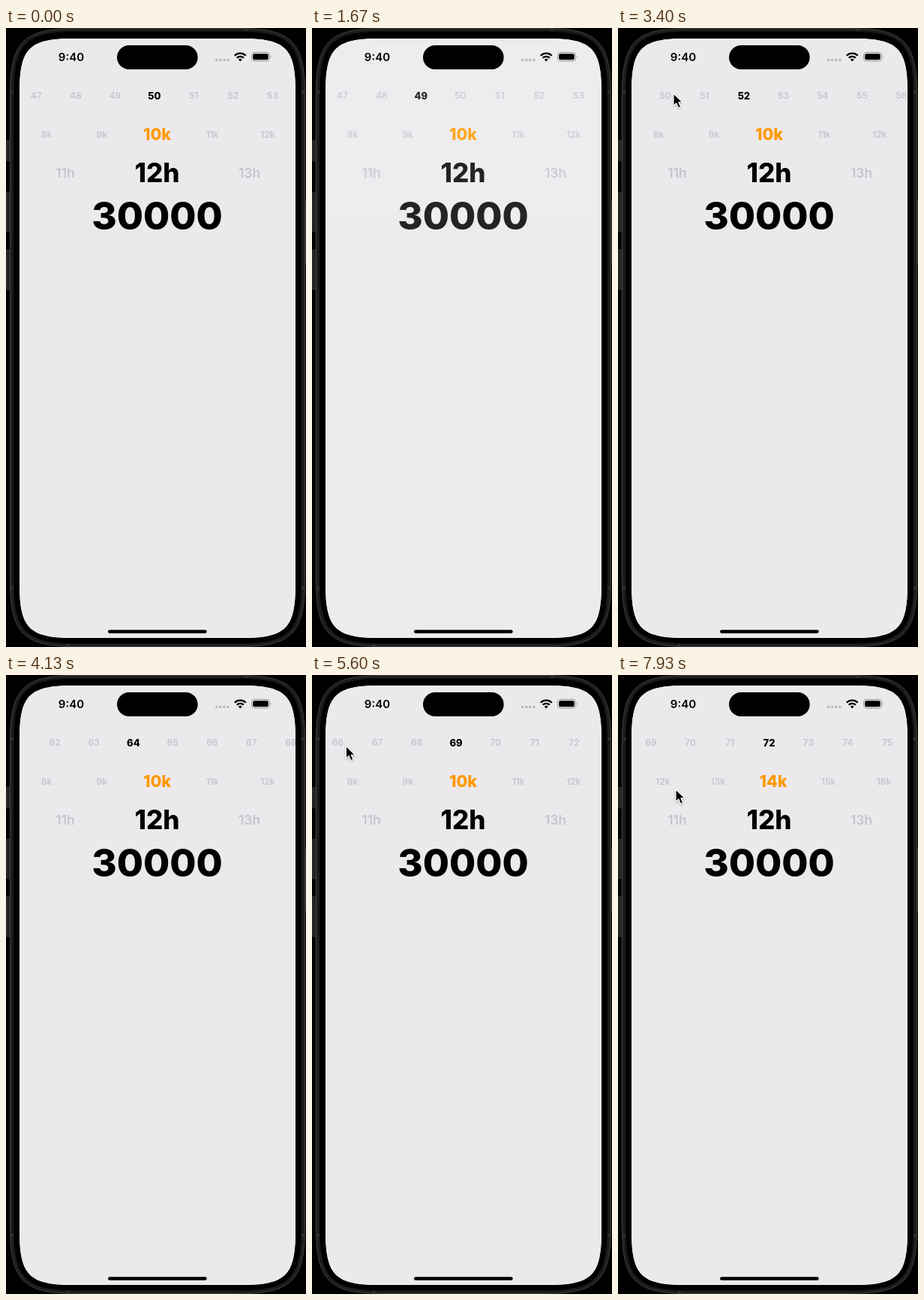
Recreate the animation shown at these times as an HTML page. Size 400 by 823 pixels, loop 8000 ms.

```html
<!DOCTYPE html>
<html lang="en">
<head>
<meta charset="utf-8">
<title>Value pickers</title>
<style>
  html, body { margin: 0; width: 100%; height: 100%; overflow: hidden; background: #000; }
  svg { display: block; width: 400px; height: 823px; }
  text { font-family: Inter, Roboto, sans-serif; text-anchor: middle; }
  .item { font-size: 12px; font-weight: 600; fill: #c3c6d0; }
  .small .on { font-size: 13px; font-weight: 800; fill: #000; }
  .orange .on { font-size: 21.5px; font-weight: 800; fill: #ff9900; }
  .hour { font-size: 17.5px; font-weight: 600; fill: #c3c6d0; }
  .now { font-size: 35px; font-weight: 800; }
  .total { font-size: 51px; font-weight: 800; }
  .clock { font-size: 15px; font-weight: 600; }
</style>
</head>
<body>
<svg viewBox="0 0 400 823">
  <defs>
    <clipPath id="clip"><path id="clipShape"/></clipPath>
    <filter id="shadow" x="-50%" y="-50%" width="200%" height="200%">
      <feDropShadow dx="0" dy="1" stdDeviation="1" flood-opacity=".35"/>
    </filter>
  </defs>

  <!-- phone body and buttons -->
  <g fill="#242424" stroke="#3a3a3a" stroke-width=".7">
    <rect x=".6" y="149" width="6" height="28" rx="1.5"/>
    <rect x=".6" y="218" width="6" height="53" rx="1.5"/>
    <rect x=".6" y="294.500" width="6" height="53.500" rx="1.5"/>
    <rect x="397" y="230" width="3" height="85" rx="1"/>
  </g>
  <path id="shell" fill="#1d1d1d" stroke="#414141"/>
  <path id="bezel" fill="#000" stroke="#111"/>
  <path d="M5 85h5M5 745h5M394 85h5M394 745h5M320 0v4M82 819v4" stroke="#303030" stroke-width="4"/>
  <path id="screen" fill="#fefcff"/>

  <g clip-path="url(#clip)">
    <g id="app">
      <rect x="17" y="13" width="370" height="800" fill="#ebe9ec"/>
      <g id="row1" class="small"></g>
      <g id="row2" class="orange"></g>
      <text class="hour" x="79" y="199">11h</text>
      <text class="now" x="201.500" y="205">12h</text>
      <text class="hour" x="324.500" y="199">13h</text>
      <text class="total" x="201.500" y="267.600">30000</text>
    </g>
  </g>

  <!-- status bar -->
  <text class="clock" x="87" y="44.300">9:40</text>
  <rect x="148" y="23" width="107.700" height="32" rx="16"/>
  <g fill="#b8b6ba">
    <circle cx="280.700" cy="42.500" r="1.700"/><circle cx="285.800" cy="42.500" r="1.700"/>
    <circle cx="290.900" cy="42.500" r="1.700"/><circle cx="296" cy="42.500" r="1.700"/>
  </g>
  <g fill="none" stroke="#000" stroke-width="2.300">
    <path d="M304.800 36.700a10.700 10.700 0 0 1 15 0"/>
    <path d="M307.700 39.700a6.500 6.500 0 0 1 9.200 0"/>
  </g>
  <path d="M309.900 41.900a3.400 3.400 0 0 1 4.800 0l-2.400 2.600z"/>
  <rect x="327.500" y="32.500" width="24" height="11.500" rx="3.500" fill="none" stroke="#99979b"/>
  <rect x="329.200" y="34.200" width="20.600" height="8.100" rx="2"/>
  <path d="M353 36.500q1.800 1.700 0 3.500z" fill="#99979b"/>
  <rect x="136" y="800.300" width="131.700" height="4.400" rx="2.200"/>

  <g id="cursor" filter="url(#shadow)">
    <path d="M0 0V16.500L3.800 13L6.500 19.200L9.500 17.900L6.900 11.800H12Z"
          stroke="#fff" stroke-width="1.100" stroke-linejoin="round"/>
  </g>
</svg>
<script>
const LOOP = 8000, STEP = 1000 / 15, CENTER = 201.5;
const $ = id => document.getElementById(id);

// Rounded box with continuous corners: len is the corner's reach, c its tightness.
function squircle(x, y, w, h, len, c) {
  const r = x + w, b = y + h;
  return `M${x + len} ${y}H${r - len}C${r - c} ${y} ${r} ${y + c} ${r} ${y + len}` +
    `V${b - len}C${r} ${b - c} ${r - c} ${b} ${r - len} ${b}` +
    `H${x + len}C${x + c} ${b} ${x} ${b - c} ${x} ${b - len}` +
    `V${y + len}C${x} ${y + c} ${x + c} ${y} ${x + len} ${y}Z`;
}
$('shell').setAttribute('d', squircle(5.5, .5, 393, 822, 88, 17.6));
$('bezel').setAttribute('d', squircle(10, 4.5, 384, 814, 84, 16));
for (const id of ['screen', 'clipShape'])
  $(id).setAttribute('d', squircle(18, 14, 368, 797, 72, 12.8));

const linear = u => u;
const easeIn = u => u * u;
const easeOut = u => 1 - (1 - u) ** 2;
const easeInOut = u => u * u * (3 - 2 * u);
const cubic = u => u < .5 ? 4 * u ** 3 : 1 - 4 * (1 - u) ** 3;
const part = (t, a, b) => Math.min(1, Math.max(0, (t - a) / (b - a)));

function makeRow(id, gap, y, yOn, unit) {
  const nodes = Array.from({ length: 9 }, () => {
    const node = document.createElementNS('http://www.w3.org/2000/svg', 'text');
    $(id).append(node);
    return node;
  });
  return (pos, selected) => {
    const first = Math.round(pos) - 4;
    nodes.forEach((node, i) => {
      const value = first + i, on = value === selected;
      node.textContent = value + unit;
      node.setAttribute('class', on ? 'item on' : 'item');
      node.setAttribute('x', CENTER + (value - pos) * gap);
      node.setAttribute('y', on ? yOn : y);
    });
  };
}
const drawSmall = makeRow('row1', 52.5, 94.4, 94.7, '');
const drawOrange = makeRow('row2', 73.7, 145.9, 149.3, 'k');

// Drag, then momentum that decays until it stops, then a second drag.
function smallPos(t) {
  if (t < 3400) return 50.07 + 2.57 * easeIn(part(t, 3200, 3400));
  const glide = Math.min(69.18, 69.7 - 17.06 * Math.exp((3400 - t) / 607));
  return glide + 2.82 * part(t, 6467, 6667);
}
const orangePos = t => 10 + 3.925 * easeInOut(part(t, 7330, 7930));
const pick = pos => Math.floor(pos + .2);

function appOpacity(t) {
  return t < 860 ? 1 : cubic(part(t, 1130, 1930));
}

// time, x, y, easing towards this point
const path = [
  [0, -30, 12], [1800, -30, 12], [1870, 6, 18, linear], [2000, 98, 43, linear],
  [2400, 205, 66, easeOut], [2870, 214, 75, easeInOut], [3130, 209, 87, easeInOut],
  [3200, 209, 87], [3400, 74, 87, easeIn], [3480, -30, 88, linear],
  [5540, -30, 95], [5860, 372, 92, linear], [6200, 365, 89, easeInOut],
  [6467, 365, 89], [6667, 217, 90, linear], [7000, 365, 120, easeInOut],
  [7270, 365, 138, easeOut], [7330, 365, 145, linear], [7930, 77, 152, easeInOut]
];
function cursorAt(t) {
  const i = path.findIndex(p => p[0] > t);
  if (i < 0) return path[path.length - 1].slice(1, 3);
  const a = path[i - 1], b = path[i];
  const u = (b[3] || linear)(part(t, a[0], b[0]));
  return [a[1] + (b[1] - a[1]) * u, a[2] + (b[2] - a[2]) * u];
}

function draw(t) {
  const small = smallPos(t), orange = orangePos(t);
  const restarting = t >= 860 && t < 2400;
  drawSmall(small, restarting ? 49 : pick(small));
  drawOrange(orange, pick(orange));
  $('app').setAttribute('opacity', appOpacity(t));
  $('cursor').setAttribute('transform', `translate(${cursorAt(t)})`);
}

const start = performance.now();
function tick() {
  const t = (performance.now() - start) % LOOP;
  draw(Math.floor((t + 4) / STEP) * STEP % LOOP);
  requestAnimationFrame(tick);
}
tick();
</script>
</body>
</html>
```
